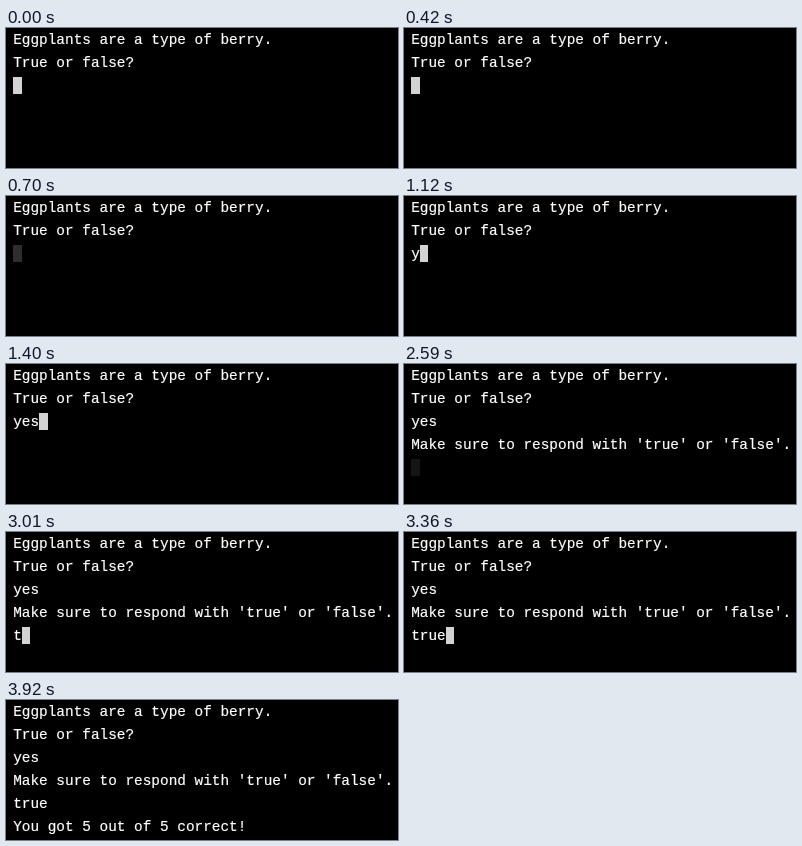
An HTML page that plays this animation: 392x140 px, repeating every 4.97 s.

```html
<!DOCTYPE html>
<html lang="en">
<head>
<meta charset="utf-8">
<title>Terminal quiz</title>
<style>
  html, body {
    margin: 0;
    width: 100%;
    height: 100%;
    overflow: hidden;
    background: #000;
  }
  #term {
    position: relative;
    width: 392px;
    height: 140px;
    overflow: hidden;
    color: #fff;
    font: 14.4px/23px "Liberation Mono", "Courier New", monospace;
    -webkit-text-stroke: .2px #fff;
    white-space: pre;
  }
  .row { position: absolute; left: 7.2px; height: 23px; }
  .row:nth-child(1) { top: 1px; }
  .row:nth-child(2) { top: 24px; }
  .row:nth-child(3) { top: 47px; }
  .row:nth-child(4) { top: 70px; }
  .row:nth-child(5) { top: 93px; }
  .row:nth-child(6) { top: 116px; }

  /* 1% = 49.7 ms */
  .in, #cursor { animation: 4970ms step-end infinite; }
  .in { visibility: hidden; }
  .y { animation-name: y; }
  .e { animation-name: e; }
  .s { animation-name: s; }
  .hint { animation-name: hint; }
  .t { animation-name: t; }
  .r { animation-name: r; }
  .ue { animation-name: ue; }
  .score { animation-name: score; }
  @keyframes y { 22.53%, to { visibility: visible; } }
  @keyframes e { 25.35%, to { visibility: visible; } }
  @keyframes s { 28.16%, to { visibility: visible; } }
  @keyframes hint { 36.61%, to { visibility: visible; } }
  @keyframes t { 60.56%, to { visibility: visible; } }
  @keyframes r { 64.78%, to { visibility: visible; } }
  @keyframes ue { 67.6%, to { visibility: visible; } }
  @keyframes score { 77.46%, to { visibility: visible; } }

  #cursor {
    position: absolute;
    left: 7.2px;
    top: 49px;
    width: 8.64px;
    height: 17px;
    background-color: #d3d3d3;
    animation-name: move, blink;
  }
  @keyframes move {
    0% { left: 7.2px; top: 49px; }
    22.53% { left: 15.84px; top: 49px; }
    25.35% { left: 24.48px; top: 49px; }
    28.16% { left: 33.12px; top: 49px; }
    36.61% { left: 7.2px; top: 95px; }
    60.56% { left: 15.84px; top: 95px; }
    64.78% { left: 24.48px; top: 95px; }
    67.6%, to { left: 41.76px; top: 95px; }
  }
  @keyframes blink {
    0% { background-color: #d3d3d3; }
    11.26% { background-color: #b1b1b1; }
    12.67% { background-color: #707070; }
    14.08% { background-color: #2e2e2e; }
    15.49% { background-color: #000; }
    22.53% { background-color: #d3d3d3; }
    49.29% { background-color: #a0a0a0; }
    50.7% { background-color: #5b5b5b; }
    52.11% { background-color: #151515; }
    54.92% { background-color: #000; }
    60.56% { background-color: #d3d3d3; }
    77.46%, to { background-color: #000; }
  }
</style>
</head>
<body>
<div id="term"><div class="row">Eggplants are a type of berry.</div><div class="row">True or false?</div><div class="row"><span class="in y">y</span><span class="in e">e</span><span class="in s">s</span></div><div class="row in hint">Make sure to respond with 'true' or 'false'.</div><div class="row"><span class="in t">t</span><span class="in r">r</span><span class="in ue">ue</span></div><div class="row in score">You got 5 out of 5 correct!</div><div id="cursor"></div></div>
</body>
</html>
```
